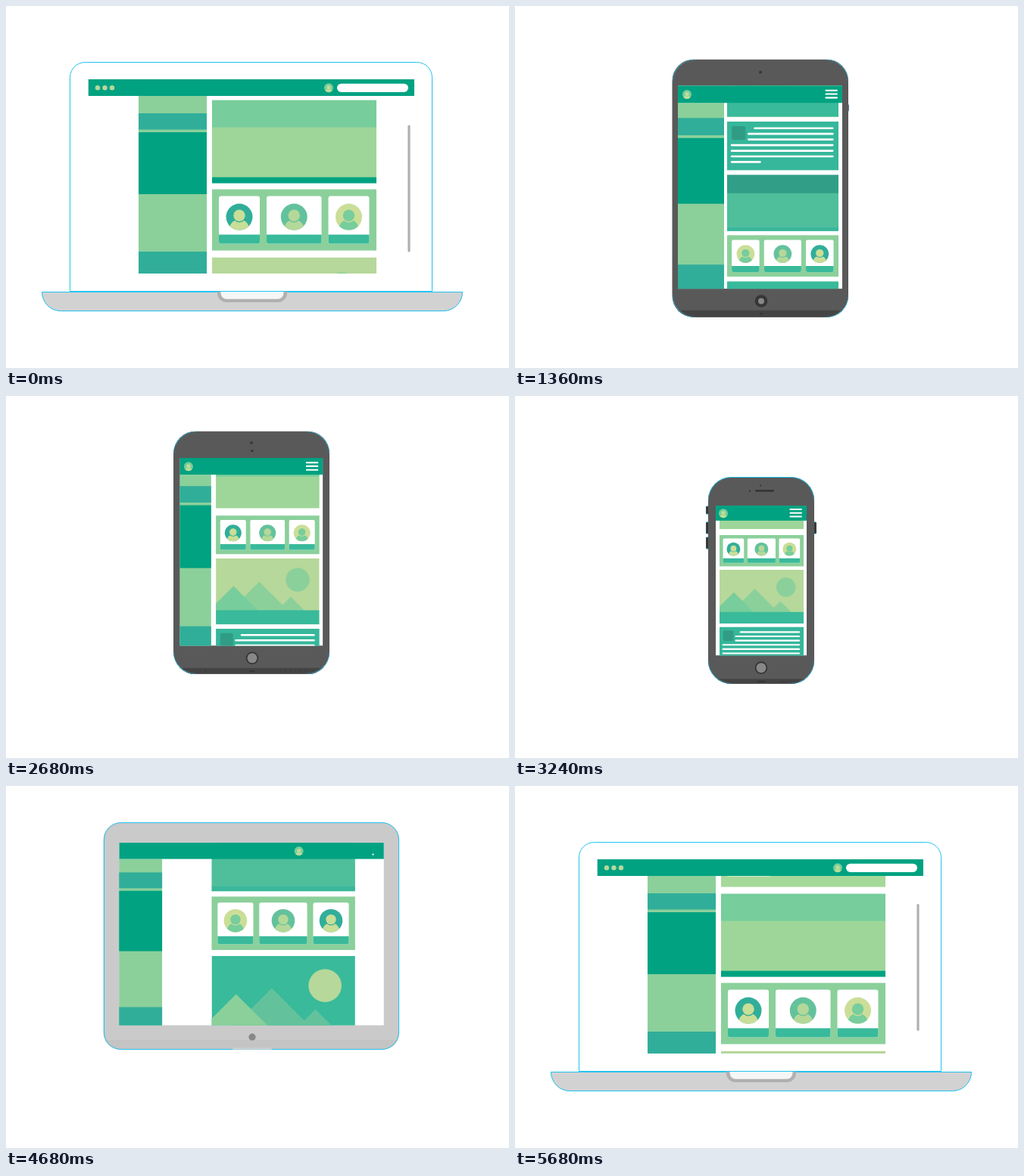
Animation, 664 px wide and 479 px high, one loop 5720 ms. Source, as an HTML page with a canvas:

```html
<!DOCTYPE html>
<html lang="en">
<head>
<meta charset="utf-8">
<title>Responsive page</title>
<style>
html, body { margin: 0; width: 100%; height: 100%; overflow: hidden; background: #fff; }
canvas { display: block; }
</style>
</head>
<body>
<canvas id="stage" width="664" height="479"></canvas>
<script>
const ctx = document.getElementById('stage').getContext('2d');
const LOOP = 5720, PERIOD = 920, LIFT = 33, FALL = 195;
const BLUE = '#22c3f0', GREEN = '#00a281', LEAF = '#8bd09b', MINT = '#77cd9b',
  LIME = '#b6d89a', TEAL = '#39ba9b', SEA = '#31ae9a', PALE = '#9ed699', INK = '#363636';

const keys = ['left', 'top', 'right', 'bottom', 'sl', 'st', 'sr', 'sb', 'head', 'ml', 'mr',
  'avatar', 'strip', 'radius', 'cam', 'sideY', 'sideK', 'dark'];
const laptop = [84, 74, 563, 384, 108.5, 97, 539, 354, 22, 272, 489, 426, 15, 20, 17, 23, 1, 0];
const tablet = [207.5, 70.5, 440, 411.5, 215, 105, 432, 374, 23, 280, 427, 227, 9, 28, 17, 20, 1.06, 1];
const phone = [255, 102, 395, 375.5, 265, 139.5, 385, 338, 20, 270, 381, 275, 6.5, 30, 11, 3, .9, 1];
// Each leg: shapes, morph times, right edge of the sidebar, take-off and fall times
const legs = [
  { from: laptop, to: tablet, morph: [500, 1200], side: [265, 276], hop: [415, 1165] },
  { from: tablet, to: phone, morph: [2500, 3000], side: [276, 258], hop: [2290, 3010] },
  { from: phone, to: laptop, morph: [4200, 4930], side: [39, 265], hop: [4188, 5130] }
];
const scrollKeys = [[0, -6], [604, 265], [1268, 265], [2440, 952], [3082, 952],
  [4680, 1441], [4847, 1441], [5720, 1834]];

const clamp = v => Math.max(0, Math.min(1, v));
const prog = (a, b, t) => clamp((t - a) / (b - a));
const mix = (a, b, p) => a + (b - a) * p;
const smooth = p => (1 - Math.cos(Math.PI * p)) / 2;
const gray = v => `rgb(${v},${v},${v})`;

function rect(x, y, w, h, color) {
  ctx.fillStyle = color;
  ctx.fillRect(x, y, w, h);
}
function round(x, y, w, h, r, color) {
  if (w <= 0 || h <= 0) return;
  ctx.beginPath();
  ctx.roundRect(x, y, w, h, r);
  ctx.fillStyle = color;
  ctx.fill();
}
function disc(x, y, r, color) {
  if (r <= 0) return;
  ctx.beginPath();
  ctx.arc(x, y, r, 0, 7);
  ctx.fillStyle = color;
  ctx.fill();
}
// One-pixel line just inside a box, aligned to whole pixels
function outline(x, y, w, h, r, color) {
  const [x1, y1, x2, y2] = [x, y, x + w, y + h].map(Math.round);
  ctx.beginPath();
  ctx.roundRect(x1 + .5, y1 + .5, x2 - x1 - 1, y2 - y1 - 1, r);
  ctx.strokeStyle = color;
  ctx.lineWidth = 1;
  ctx.stroke();
}

function person(x, y, r, back, front) {
  ctx.save();
  disc(x, y, r, back);
  ctx.clip();
  disc(x, y + r * .92, r * .74, front);
  disc(x, y - r * .08, r * .5, back);
  disc(x, y - r * .1, r * .44, front);
  ctx.restore();
}

function banner(top, body, strip) {
  rect(0, 0, 217, 36.5, top);
  rect(0, 36, 217, 66.5, body);
  if (strip) rect(0, 102, 217, 8, strip);
}
function people(flip) {
  const looks = [[SEA, '#c9de97'], ['#63c29c', '#b4d899'], ['#cbde98', MINT]];
  if (flip) looks.reverse();
  rect(0, 0, 217, 81, LEAF);
  [[9, 54], [72, 72.5], [153.5, 54]].forEach(([x, w], i) => {
    round(x, 9, w, 63, 3, '#fff');
    round(x, 60, w, 12, [0, 0, 3, 3], TEAL);
    person(x + w / 2, 36.5, 17.5, ...looks[i]);
  });
}
function hills(sky, sun, near, far, ground) {
  ctx.save();
  ctx.beginPath();
  ctx.rect(0, 0, 217, 139);
  ctx.clip();
  rect(0, 0, 217, 139, sky);
  disc(171.5, 45, 25, sun);
  for (const [x, y, color] of [[91, 49, far], [157, 81, far], [37, 58, near]]) {
    ctx.beginPath();
    ctx.moveTo(x, y);
    ctx.lineTo(x + 110 - y, 110);
    ctx.lineTo(x - 110 + y, 110);
    ctx.fillStyle = color;
    ctx.fill();
  }
  rect(0, 109, 217, 30, ground);
  ctx.restore();
}
function article(back, square) {
  rect(0, 0, 217, 95, back);
  round(9, 9, 27, 27, 4, square);
  for (let i = 0; i < 7; i++) {
    const x = i === 0 ? 52 : i < 3 ? 40 : 7;
    round(x, 11 + 11 * i, (i === 6 ? 66 : 207.5) - x, 4, 2, '#fff');
  }
}
const cards = [
  [0, 110, d => banner(MINT, PALE, d < .5 && GREEN)],
  [118, 81, () => people(false)],
  [208, 139, () => hills(LIME, LEAF, MINT, LEAF, TEAL)],
  [356, 95, () => article('#36b79b', '#319c86')],
  [460, 110, () => banner('#319f88', '#4fbf9b', '#39b79b')],
  [578, 81, () => people(true)],
  [668, 139, () => hills(TEAL, LIME, LEAF, '#63c29c', MINT)],
  [816, 95, () => article('#a5d99a', LEAF)]
];

function scrollAt(t) {
  const i = Math.max(1, scrollKeys.findIndex(k => k[0] >= t));
  const [a, b] = [scrollKeys[i - 1], scrollKeys[i]];
  return mix(a[1], b[1], prog(a[0], b[0], t));
}
function liftAt(t) {
  for (const { hop: [up, down] } of legs) {
    const v = t - down - FALL;
    if (t < up || v > 300) continue;
    if (t < down) return LIFT * Math.sin(prog(up, up + 200, t) * Math.PI / 2);
    if (v < 0) return LIFT * Math.cos((v + FALL) / FALL * Math.PI / 2);
    return -10 * Math.sin(Math.PI * v / 150) * Math.exp(-v / 150);
  }
  return 0;
}

function poseAt(t) {
  const leg = legs[t < 1800 ? 0 : t < 3600 ? 1 : 2];
  const p = smooth(prog(...leg.morph, t)), pose = {};
  keys.forEach((k, n) => pose[k] = mix(leg.from[n], leg.to[n], p));
  pose.side = mix(...leg.side, p);
  pose.base = 1 - prog(420, 620, t) + prog(4665, 4832, t);
  const lift = liftAt(t);
  for (const k of ['top', 'bottom', 'st', 'sb']) pose[k] -= lift;
  // The screen rests lower on the keyboard as its bottom corners square off
  pose.ext = 6 * clamp((1 - pose.base) / .7);
  pose.bottom -= 6 - pose.ext;
  return pose;
}

function sideButtons(o, t) {
  const tab = prog(1310, 1450, t) - prog(2250, 2350, t);
  const pho = prog(3080, 3250, t) - prog(4090, 4180, t);
  const button = (x, y, h, w) => {
    if (w <= 0) return;
    round(x, o.top + y, w, h, 1, '#0c7fa0');
    round(x, o.top + y + 1, w, h - 2, 1, INK);
  };
  button(o.right - 1, 59, 10, 4 * tab);
  for (const [y, h] of [[38, 11], [59, 16], [79, 16]]) button(o.left - 3 * pho, y, h, 4 * pho);
  button(o.right - 1, 59, 16, 4 * pho);
}

function body(o) {
  const w = o.right - o.left, h = o.bottom - o.top, r = o.radius;
  const light = Math.pow(clamp((1 - o.dark) * 1.03), 1.4);
  const low = r * clamp(o.ext / 6), corners = [r, r, low, low];
  const shell = gray(mix(89, 255, light));
  ctx.save();
  round(o.left, o.top, w, h, corners, shell);
  ctx.clip();
  rect(o.left, o.bottom - o.strip, w, o.strip, gray(mix(68, 255, light)));
  ctx.restore();
  outline(o.left, o.top, w, h, corners, BLUE);
  if (o.dark > .5) outline(o.left, o.top + .5, w, h - .5, r + 2, shell);
}

function details(o, t) {
  const x = 325, top = o.top, low = o.bottom;
  const y = (o.sb + low) / 2 - 2.5 * o.dark;
  disc(x, y, 8.3 * (prog(1150, 1320, t) - prog(4450, 4640, t)), INK);
  disc(x, y, 6.5 * (prog(1270, 1420, t) - prog(4610, 4850, t)), '#888');
  const cam = prog(1100, 1250, t) - prog(4300, 4500, t);
  disc(x - 1, top + o.cam, mix(1.9, 1.1, prog(2680, 3000, t)) * cam, INK);
  const bar = prog(2600, 2680, t) - prog(4300, 4500, t);
  const half = mix(1.8, 12.5, prog(2680, 3050, t)) * bar;
  const barY = top + mix(26, 18, prog(2680, 3000, t));
  round(x - half + 4.5 * prog(2680, 3050, t), barY - 1.3, half * 2, 2.6, 1.3, INK);
  disc(310, barY, 1.2 * (prog(3050, 3200, t) - prog(4200, 4300, t)), INK);
  if (cam > 0) {
    const slotY = low - o.strip / 2;
    const slot = mix(2.5, 6, prog(2500, 3000, t)) * cam;
    round(x - slot, slotY - 1, slot * 2, 2, 1, INK);
    const holes = prog(2550, 2680, t) - prog(4250, 4400, t);
    const spread = (o.right - o.left) / 2;
    disc(x - spread * .6, slotY, .9 * holes, INK);
    for (let i = 0; i < 6; i++) disc(x + spread * (.36 + .065 * i), slotY, .8 * holes, INK);
  }
}

function page(o, t) {
  const { sl, st, sr, sb } = o, viewTop = st + o.head;
  ctx.save();
  ctx.beginPath();
  ctx.rect(sl, st, sr - sl, sb - st);
  ctx.clip();
  rect(sl, st, sr - sl, sb - st, '#fff');

  const sx = o.side - 90, at = v => viewTop + o.sideY + v * o.sideK;
  rect(sx, viewTop, 90, sb - viewTop, LEAF);
  rect(sx, at(0), 90, 21.5 * o.sideK, SEA);
  rect(sx, at(25), 90, 82 * o.sideK, GREEN);
  rect(sx, at(183), 90, 90, SEA);

  const scale = (o.mr - o.ml) / 217, scroll = scrollAt(t);
  const from = Math.floor(scroll / PERIOD) - 1;
  for (let n = from; n < from + 4; n++) {
    for (const [y, h, draw] of cards) {
      const cy = viewTop + (n * PERIOD + y - scroll) * scale;
      if (cy > sb || cy + h * scale < viewTop) continue;
      ctx.save();
      ctx.translate(o.ml, cy);
      ctx.scale(scale, scale);
      draw(o.dark);
      ctx.restore();
    }
  }

  rect(sl, st, sr - sl, o.head, GREEN);
  const hy = st + o.head / 2 + .3;
  person(o.avatar, hy, 6, MINT, '#c0dc98');
  for (let i = 0; i < 3; i++) {
    const dot = 1 - prog(430 + 50 * i, 550 + 50 * i, t) + prog(4900 + 50 * i, 5020 + 50 * i, t);
    disc(sl + 12.5 + 9.5 * i, hy, 3.2 * dot, LIME);
    const line = 16.5 * (prog(980 + 50 * i, 1110 + 50 * i, t) - prog(4490 + 40 * i, 4620 + 40 * i, t));
    round(sr - 14.3 - line / 2, hy - 6.3 + 4.8 * i, line, 2.1, 1, '#fff');
  }
  const pill = 1 - prog(420, 540, t) + prog(4900, 5080, t);
  const pillH = 11.2 * Math.min(1, pill * 3);
  round(sr - 55 - 47 * pill, hy - pillH / 2, 94 * pill, pillH, 5.6, '#fff');

  const bar = 1 - prog(580, 640, t) + prog(4850, 4930, t);
  if (bar > 0) {
    const u = t > 3000 ? t - LOOP : t;
    ctx.globalAlpha = bar;
    round(530.4, viewTop + 38.5 + .04 * u, 3.2, 168, 1.6, '#b0b0b0');
  }
  ctx.restore();
}

function keyboard(o) {
  if (o.base <= 0) return;
  const w = 556 * o.base, h = 26 * Math.min(1, 10 * o.base * o.base);
  const x = 325 - w / 2, y = o.bottom - Math.min(o.ext, h);
  const r = Math.min(26, h, w / 2), corners = [0, 0, r, r];
  round(x, y, w, h, corners, '#d2d2d2');
  if (h > o.ext) {
    ctx.save();
    ctx.beginPath();
    ctx.rect(0, o.bottom - .5, 664, 40);
    ctx.clip();
    outline(x, y, w, h, corners, BLUE);
    ctx.restore();
  }
  const k = mix(1, .89, clamp((1 - o.base) / .7)) * prog(.15, .3, o.base);
  round(325 - 46 * k, y, 92 * k, 14 * k, [0, 0, 12 * k, 12 * k], '#b0b0b0');
  round(325 - 41.5 * k, y, 83 * k, 9.8 * k, [0, 0, 8 * k, 8 * k], '#f6f6f6');
}

function frame(now) {
  const t = now % LOOP, o = poseAt(t);
  rect(0, 0, 664, 479, '#fff');
  sideButtons(o, t);
  body(o);
  page(o, t);
  details(o, t);
  keyboard(o);
}

const start = performance.now();
function tick() {
  frame(performance.now() - start);
  requestAnimationFrame(tick);
}
tick();
</script>
</body>
</html>
```
